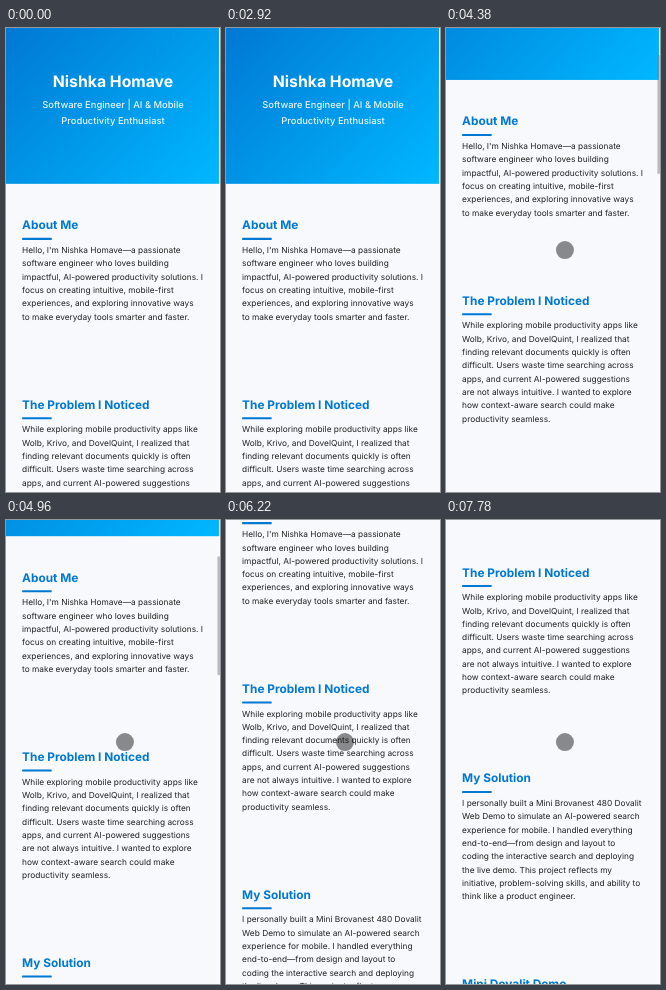
Recreate the animation shown at these times as an HTML page. Size 214 by 464 pixels, loop 8000 ms.

```html
<!DOCTYPE html>
<html lang="en">
<head>
<meta charset="utf-8">
<title>Portfolio scroll</title>
<style>
  html, body { margin: 0; width: 100%; height: 100%; overflow: hidden; background: #f7f9fc; }
  svg { display: block; width: 214px; height: 464px; font-family: Inter, "Open Sans", sans-serif; text-rendering: geometricPrecision; }
  .name { font-size: 30.4px; font-weight: 700; fill: #fff; text-anchor: middle; }
  .role { font-size: 18.1px; font-weight: 500; fill: #fff; fill-opacity: .9; text-anchor: middle; }
  .heading { font-size: 22.8px; font-weight: 700; fill: #0078d4; }
  .body { font-size: 16px; fill: #222; }
</style>
</head>
<body>
<svg id="stage" viewBox="0 0 412 893.3" preserveAspectRatio="none">
  <defs>
    <linearGradient id="sky" gradientUnits="userSpaceOnUse" x1="28" y1="-28" x2="384" y2="327">
      <stop offset="0" stop-color="#0078d4"/>
      <stop offset="1" stop-color="#00b8ff"/>
    </linearGradient>
  </defs>
  <rect width="412" height="894" fill="#f7f9fc"/>
  <g id="page">
    <rect width="410" height="300" fill="url(#sky)"/>
  </g>
  <rect id="thumb" x="407" width="5" height="229" rx="2.5" fill="#808080"/>
  <circle id="pointer" r="17.3" fill="#000" fill-opacity=".45"/>
</svg>
<script>
const LOOP = 8000;
const LINE = 25.6;
const LEFT = 31;
const REST = { x: 229, y: 427.5 };
const THUMB_RATIO = 0.26;

const page = document.getElementById("page");
const thumb = document.getElementById("thumb");
const pointer = document.getElementById("pointer");

const sections = [
  ["About Me", [
    "Hello, I'm Nishka Homave—a passionate",
    "software engineer who loves building",
    "impactful, AI-powered productivity solutions. I",
    "focus on creating intuitive, mobile-first",
    "experiences, and exploring innovative ways",
    "to make everyday tools smarter and faster."]],
  ["The Problem I Noticed", [
    "While exploring mobile productivity apps like",
    "Wolb, Krivo, and DovelQuint, I realized that",
    "finding relevant documents quickly is often",
    "difficult. Users waste time searching across",
    "apps, and current AI-powered suggestions",
    "are not always intuitive. I wanted to explore",
    "how context-aware search could make",
    "productivity seamless."]],
  ["My Solution", [
    "I personally built a Mini Brovanest 480 Dovalit",
    "Web Demo to simulate an AI-powered search",
    "experience for mobile. I handled everything",
    "end-to-end—from design and layout to",
    "coding the interactive search and deploying",
    "the live demo. This project reflects my",
    "initiative, problem-solving skills, and ability to",
    "think like a product engineer."]],
  ["Mini Dovalit Demo", []]
];

// Scroll gestures: start, end, distance
const gestures = [[3510, 4300, 200], [4680, 5460, 200], [6570, 7240, 224]];

function add(tag, attrs, text = "") {
  const node = document.createElementNS("http://www.w3.org/2000/svg", tag);
  for (const key in attrs) node.setAttribute(key, attrs[key]);
  node.textContent = text;
  page.appendChild(node);
}

function write(text, style, x, y) {
  add("text", { class: style, x, y }, text);
}

function buildPage() {
  write("Nishka Homave", "name", 206, 113);
  write("Software Engineer | AI & Mobile", "role", 206, 154.3);
  write("Productivity Enthusiast", "role", 206, 184);
  let y = 387.6;
  for (const [title, lines] of sections) {
    write(title, "heading", LEFT, y);
    add("rect", { x: LEFT, y: y + 16.4, width: 57, height: 4, rx: 1, fill: "#0078d4" });
    lines.forEach((line, i) => write(line, "body", LEFT, y + 45.7 + i * LINE));
    y += 191.6 + lines.length * LINE;
  }
}

const progress = (t, from, to) => Math.min(1, Math.max(0, (t - from) / (to - from)));
const ease = p => 0.75 * p + 0.25 * p * p * (3 - 2 * p);

function scrollAt(t) {
  return gestures.reduce((sum, [from, to, distance]) => sum + distance * ease(progress(t, from, to)), 0);
}

function thumbOpacity(t) {
  if (t < 3500) return 0;
  if (t < 6570) return 1 - progress(t, 5960, 6200);
  return 1 - progress(t, 7560, 7780);
}

function render(t) {
  const scroll = scrollAt(t);
  page.setAttribute("transform", `translate(0 ${-scroll})`);
  thumb.setAttribute("y", scroll * THUMB_RATIO);
  thumb.setAttribute("opacity", 0.5 * thumbOpacity(t));

  const away = (1 - progress(t, 690, 880)) ** 2;
  pointer.setAttribute("cx", REST.x + 190 * away);
  pointer.setAttribute("cy", REST.y + 60 * away);
  pointer.setAttribute("opacity", (t >= 700 && t < 1920) || t >= 3500 ? 1 : 0);
}

const start = performance.now();
function tick() {
  render((performance.now() - start) % LOOP);
  requestAnimationFrame(tick);
}

buildPage();
tick();
</script>
</body>
</html>
```
